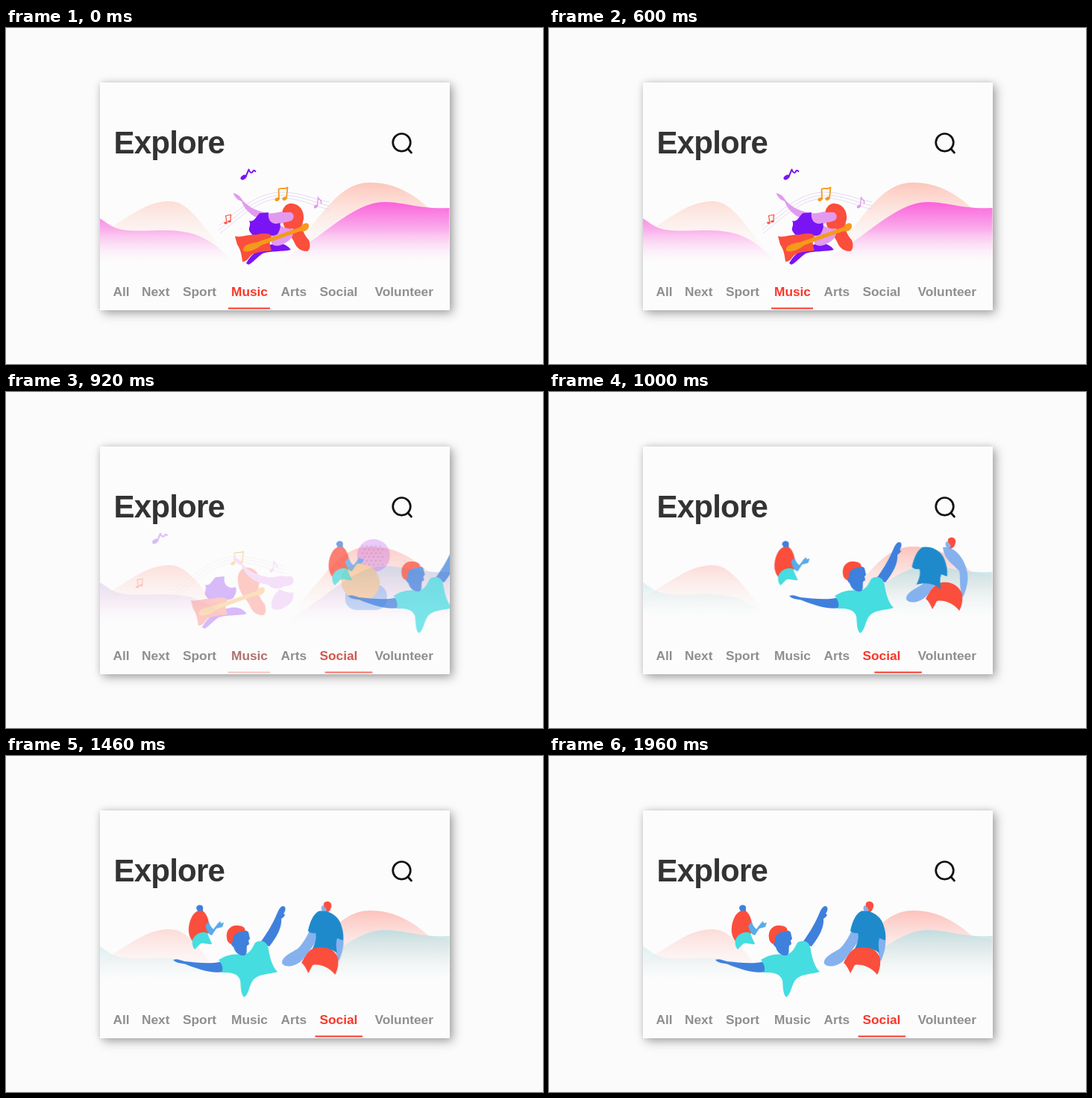
An HTML page that plays this animation: 720 px wide and 450 px high, repeating every 1980 ms.

```html
<!DOCTYPE html>
<html lang="en">
<head>
<meta charset="utf-8">
<title>Explore</title>
<style>
  html, body { margin: 0; width: 100%; height: 100%; overflow: hidden; background: #fbfbfb; }
  .card {
    position: absolute; left: 126px; top: 73px; width: 468.5px; height: 304.5px;
    background: #fcfcfc;
    box-shadow: 4px 4px 13px rgba(0, 0, 0, .34), 0 0 8px rgba(0, 0, 0, .1);
  }
  svg { position: absolute; left: 0; top: 0; display: block; }
  text { font-family: "Liberation Sans", Arial, Helvetica, sans-serif; font-weight: bold; }
  .title { font-size: 42px; letter-spacing: -.8px; fill: #333; }
  .tabs { font-size: 17.3px; fill: #8f8f8f; }
  .red { fill: #fb4e3c; }
  .violet { fill: #7a14f5; }
  .skin { fill: #e29af0; }
  .amber { fill: #f59a1c; }
  .blue { fill: #3f80dc; }
  .teal { fill: #45dde0; }
  .sky { fill: #85b1ef; }
  .navy { fill: #1f8acb; }
  .line { fill: none; stroke-linecap: round; stroke-linejoin: round; }
</style>
</head>
<body>
<div class="card"></div>
<svg width="720" height="450" viewBox="0 0 720 450">
  <defs>
    <clipPath id="frame"><rect x="126" y="73" width="468.5" height="304.5"/></clipPath>
    <linearGradient id="peach" gradientUnits="userSpaceOnUse" x1="0" y1="205" x2="0" y2="300">
      <stop offset="0" stop-color="#fdc4b8"/>
      <stop offset="1" stop-color="#fdeee8" stop-opacity="0"/>
    </linearGradient>
    <linearGradient id="pink" gradientUnits="userSpaceOnUse" x1="0" y1="232" x2="0" y2="314">
      <stop offset="0" stop-color="#fb5fdc"/>
      <stop offset=".45" stop-color="#f9a6ea" stop-opacity=".93"/>
      <stop offset="1" stop-color="#fce8fa" stop-opacity="0"/>
    </linearGradient>
    <linearGradient id="rose" gradientUnits="userSpaceOnUse" x1="0" y1="205" x2="0" y2="290">
      <stop offset="0" stop-color="#fdc0ba"/>
      <stop offset="1" stop-color="#fde6e3" stop-opacity="0"/>
    </linearGradient>
    <linearGradient id="mist" gradientUnits="userSpaceOnUse" x1="0" y1="232" x2="0" y2="300">
      <stop offset="0" stop-color="#b5dde0" stop-opacity=".85"/>
      <stop offset="1" stop-color="#e4f4f5" stop-opacity="0"/>
    </linearGradient>
    <path id="back" d="M126 275C160 258 185 232 219 232C252 232 268 280 304 306H126ZM365 306C415 278 435 207 488 207C525 207 550 226 567 241L594.500 246V308Z"/>
    <path id="front" d="M126 255C140 264 145 271 172 271.500C205 272 228 268 255 277C278 286 288 297 304 312H126ZM380 304C425 280 465 233 508 233C540 234 555 243 594.500 241V314H372Z"/>
  </defs>

  <g clip-path="url(#frame)">
    <g class="music">
      <use href="#back" fill="url(#peach)"/>
      <use href="#front" fill="url(#pink)"/>
    </g>
    <g class="social">
      <use href="#back" fill="url(#rose)"/>
      <use href="#front" fill="url(#mist)"/>
    </g>

    <g class="music">
      <g data-slide="-105">
        <g id="staff" class="line" stroke="#dccdec" stroke-width=".7"></g>
        <g class="amber">
          <ellipse cx="363.500" cy="229.500" rx="3.200" ry="2.300" transform="rotate(-30 363.500 229.500)"/>
          <ellipse cx="373.500" cy="228.500" rx="3.200" ry="2.300" transform="rotate(-30 373.500 228.500)"/>
          <path class="line" stroke="#f59a1c" stroke-width="1.800" d="M366 229L365.500 216C369 213 373 217 377.500 213.500L376 228"/>
        </g>
        <ellipse class="skin" cx="415.500" cy="239" rx="3" ry="2" transform="rotate(-40 415.500 239)"/>
        <path class="line" stroke="#e29af0" stroke-width="1.400" d="M417.500 238L418.500 226.500C419 231 424 229 422.500 235"/>
      </g>
      <g data-slide="-210">
        <ellipse class="violet" cx="318.500" cy="200" rx="4.400" ry="2.800" transform="rotate(-35 318.500 200)"/>
        <path class="line" stroke="#7a14f5" stroke-width="2" d="M321.500 199L325.500 189.500C327 194 330 195 331 192C332 190 333 191 334.500 192"/>
        <ellipse class="red" cx="294.500" cy="261" rx="2.300" ry="1.600"/>
        <ellipse class="red" cx="299.500" cy="259" rx="2.300" ry="1.600"/>
        <path class="line" stroke="#fb4e3c" stroke-width="1.200" d="M296 260L294.500 251.500L301.500 250L301 258"/>
      </g>
      <g data-slide="-105">
        <path class="red" d="M370 250C370 241 376 234 383 235C395 236 400 246 399 256C395 268 399 276 406 284C409 292 407 299 403 299C396 299 390 295 387 288C384 280 378 276 374 268C371 262 370 256 370 250Z"/>
        <path class="violet" d="M322 315C330 300 345 292 360 289C372 287 378 292 382 297C370 300 355 298 344 302C338 306 330 315 325 317Z"/>
      </g>
      <path class="skin" d="M304.500 221C309 222 313 224 316 229C322 238 335 245 347 247C354 250 362 247 369 246C374 248 378 246 382 247C386 249 387 253 384 257C380 260 376 259 371 261C366 265 356 264 351 258C340 257 322 250 316 232C312 231 307 228 304.500 221Z"/>
      <path class="skin" d="M356 283C356 276 361 270 367 264C374 268 381 270 385 268C387 277 382 285 372 289C366 293 359 292 356 289Z"/>
      <g data-slide="-105">
        <path class="violet" d="M326 258C332 261 336 252 340 248L352 247C350 258 358 265 367 261C369 266 367 271 364 276C357 281 350 276 340 276C336 281 330 279 326 271C325 267 329 264 326 258Z"/>
        <path class="red" d="M307 279C316 281 325 276 335 277C345 274 356 275 356 279C352 285 354 292 356 298C345 300 335 299 328 305C324 310 322 313 317 313C316 305 315 297 310 290Z"/>
        <path class="amber" d="M318 298C316 293 325 288 336 287L394 267C398 261 405 259 406 264C407 270 400 274 395 272L342 291C335 297 322 302 318 298Z"/>
      </g>
    </g>

    <g class="passing" data-slide="300" data-rest="-240">
      <rect x="564" y="258" width="56" height="34" rx="15" fill="#3a8af0"/>
      <circle cx="602" cy="219" r="22" fill="#bb4df0"/>
      <g id="dots" fill="#331a4d"></g>
      <path class="amber" d="M559 250C560 238 568 231 580 231C592 230 604 234 608 246C614 258 608 272 596 278C584 281 573 279 566 270C560 265 558 258 559 250Z"/>
    </g>

    <g class="social">
      <g data-slide="571" data-pow="1.355">
        <path class="blue" d="M255 204C255 199 262 198 264 202L264 208L258 210Z"/>
        <path class="red" d="M256 208L263 207C268 210 271 217 272 224L271 238C264 237 256 241 250 248C246 243 244 236 245 229C246 220 250 211 256 208Z"/>
        <path class="teal" d="M250 246C254 238 262 234 270 237C272 244 275 248 276 252C270 253 264 249 260 252L253 259C250 256 249 251 250 246Z"/>
        <path fill="#58abec" d="M267 227L272 222C273 227 276 230 278 232L284 224L287 221L288 224L292 223L290 229L282 231L276 240C272 240 269 235 267 227Z"/>
      </g>
      <g data-slide="540">
        <path class="blue" d="M223 273C228 271 232 273 238 275C255 277 275 279 290 275L291 289C275 292 255 285 240 279C234 277 227 278 223 273Z"/>
        <path class="blue" d="M339 251C347 240 356 226 361 214C364 207 366 202 370 201C374 201 375 206 371 211C375 213 371 216 368 218C369 230 362 242 352 255Z"/>
        <path class="teal" d="M284 273C293 267 304 264 315 266C326 266 329 257 333 250C342 245 350 249 351 260C353 272 357 284 363 289C350 293 336 291 329 302C325 308 324 320 318 323C313 318 314 308 313 301C310 290 299 290 288 290C291 284 288 278 284 273Z"/>
        <path class="blue" d="M302 240C308 233 320 231 324 236L326 245L324 247L325 252L322 254C321 260 323 264 319 267C311 268 306 263 304 256C299 252 299 246 302 240Z"/>
        <path class="red" d="M295 244C293 234 300 226 309 227C317 227 321 231 319 235C311 235 305 237 303 244C304 249 301 251 300 252C297 250 295 247 295 244Z"/>
      </g>
      <g data-slide="600">
        <path class="sky" d="M418 208C432 205 448 222 451 243C453 256 447 270 445 275C439 262 442 248 440 240C432 230 420 226 418 208Z"/>
        <path class="sky" d="M369 278C367 270 380 264 390 258C398 250 403 240 407 231L418 238C416 250 404 262 397 272C390 281 374 285 369 278Z"/>
        <path class="red" d="M395 277C400 267 406 257 417 255C430 253 441 261 444 271C445 279 443 288 440 293C433 284 421 278 410 280L404 291C401 284 398 279 395 277Z"/>
        <path class="red" d="M425 209C426 203 422 196 428 195C434 194 437 199 434 205C432 210 428 210 425 209Z"/>
        <path class="sky" d="M423 200L427 203C430 206 428 210 425 209C422 208 420 204 423 200Z"/>
      </g>
      <g data-slide="450">
        <path class="navy" d="M418 208C430 206 443 212 448 225C451 234 452 240 451 247L443 244C441 252 442 258 443 264C434 257 423 254 410 258C414 250 416 243 414 237C409 238 405 236 404 234C407 221 411 212 418 208Z"/>
      </g>
    </g>

    <text class="title" x="144.600" y="168.300">Explore</text>
    <g class="line" stroke="#111" stroke-width="2.700">
      <circle cx="530.500" cy="153.300" r="11.800"/>
      <path d="M539 162L543.500 167"/>
    </g>
    <g id="tabs" class="tabs"></g>
    <rect class="music" x="298" y="374.500" width="56" height="2" fill="#f8382a"/>
    <g class="social"><rect id="bar" x="414.500" y="374.500" width="63.500" height="2" fill="#f8382a"/></g>
  </g>
</svg>
<script>
  const LOOP = 1980;
  const GREY = '#8f8f8f', RED = '#f8382a';
  const $ = id => document.getElementById(id);

  function add(parent, tag, attrs, label = '') {
    const el = document.createElementNS('http://www.w3.org/2000/svg', tag);
    for (const key in attrs) el.setAttribute(key, attrs[key]);
    el.textContent = label;
    parent.append(el);
    return el;
  }

  // Plays [time, value] steps, holding the first and last values.
  function play(el, prop, steps, format = v => v) {
    const first = steps[0][1], last = steps[steps.length - 1][1];
    const frames = [[0, first], ...steps, [LOOP, last]].map(([time, value]) => ({
      offset: time / LOOP, [prop]: format(value)
    }));
    el.animate(frames, { duration: LOOP, iterations: Infinity });
  }

  const shift = v => `translateX(${v}px)`;

  // Share of the journey still to go.
  const remaining = [
    [780, 1], [810, .92], [840, .8], [900, .52], [950, .32], [1000, .185],
    [1060, .095], [1140, .04], [1240, .015], [1460, .002], [1600, 0]
  ];
  const fade = [[780, 0], [840, .2], [900, .6], [950, .88], [990, 1]];
  const fadeOut = fade.map(([time, v]) => [time, 1 - v]);
  const spring = [
    [780, -85], [810, -65], [840, -41], [880, -8], [920, 13], [960, 21],
    [1000, 22], [1040, 15], [1090, 4], [1140, -2], [1200, -2.5], [1280, .5], [1380, 0]
  ];

  for (let i = 0; i < 3; i++) {
    const y = i * 5;
    add($('staff'), 'path', {
      d: `M${285 + i} ${265 + y}C${310 + i} ${246 + y} 336 ${220 + y * .9} 370 ${220 + y * .8}C396 ${220 + y * .8} 410 ${229 + y * .9} 433 ${233 + y}`
    });
  }
  for (let i = 0; i < 30; i++) {
    const row = Math.floor(i / 5);
    add($('dots'), 'circle', { cx: 587 + i % 5 * 6 + row % 2 * 3, cy: 206 + row * 5, r: 1 });
  }

  const tabs = { All: 143.5, Next: 182, Sport: 237, Music: 302, Arts: 368.5, Social: 420.5, Volunteer: 494.5 };
  for (const name in tabs) {
    const tab = add($('tabs'), 'text', { x: tabs[name], y: 359.3 }, name);
    if (name === 'Music') play(tab, 'fill', [[780, RED], [990, GREY]]);
    if (name === 'Social') play(tab, 'fill', [[780, GREY], [840, '#a67c79'], [990, RED]]);
  }

  document.querySelectorAll('.music, .passing').forEach(el => play(el, 'opacity', fadeOut));
  document.querySelectorAll('.social').forEach(el => play(el, 'opacity', fade));
  document.querySelectorAll('[data-slide]').forEach(el => {
    const { slide, pow = 1, rest = 0 } = el.dataset;
    const leaving = slide < 0;
    const steps = remaining.map(([time, v]) => [
      time, leaving ? slide * (1 - v) : slide * v ** pow + +rest
    ]);
    play(el, 'transform', steps, shift);
  });
  play($('bar'), 'transform', spring, shift);
</script>
</body>
</html>
```
